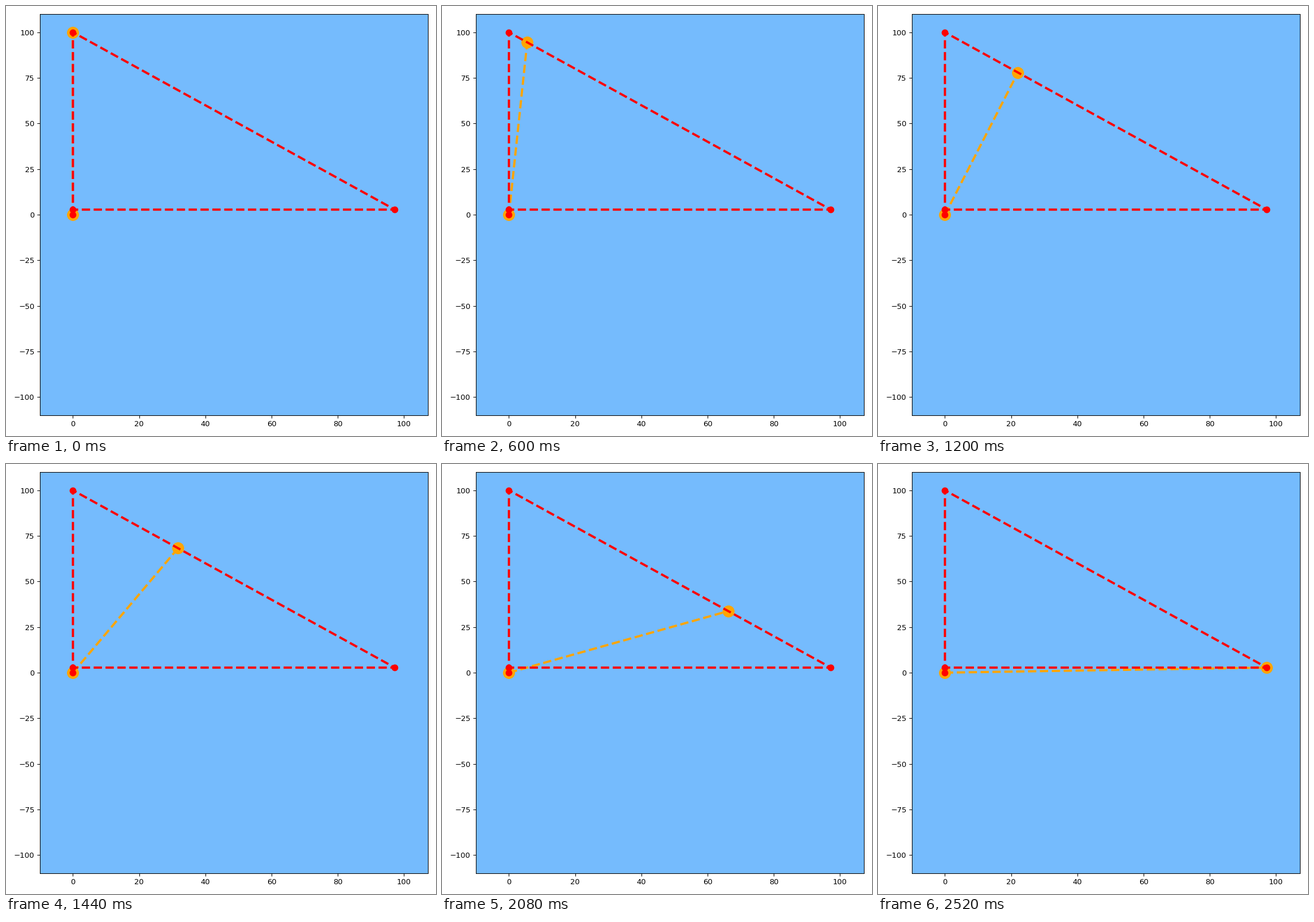
Recreate the animation shown at these times as a matplotlib script. Size 748 by 748 pixels, loop 2560 ms.

```python
import matplotlib.pyplot as plt
from matplotlib.animation import FuncAnimation

SIZE, INCHES = 748, 8
FRAMES, INTERVAL = 64, 40
HEIGHT, GRAVITY, STEP = 100, 9.8, 0.1


def ball(n):
    """Position on a frictionless 45 degree slope after n time steps."""
    x = GRAVITY / 4 * (n * STEP) ** 2
    return x, HEIGHT - x


end_x, end_y = ball(FRAMES - 1)

fig, ax = plt.subplots(figsize=(INCHES, INCHES), dpi=SIZE / INCHES,
                       facecolor="white")
ax.set_facecolor("xkcd:sky blue")
ax.set_xlim(-10, end_x + 10)
ax.set_ylim(-HEIGHT - 10, HEIGHT + 10)
ax.set_xticks(range(0, 101, 20))
ax.set_yticks(range(-100, 101, 25))

arm, = ax.plot([0, 0], [0, HEIGHT], "o--", color="orange", lw=3, markersize=15)
ax.plot([0, 0, end_x, 0], [0, HEIGHT, end_y, end_y],
        "o--", color="red", lw=3, markersize=8)
fig.tight_layout()


def update(n):
    x, y = ball(n)
    arm.set_data([0, x], [0, y])
    return arm,


anim = FuncAnimation(fig, update, frames=FRAMES, interval=INTERVAL,
                     repeat=True, repeat_delay=0)
plt.show()
```
